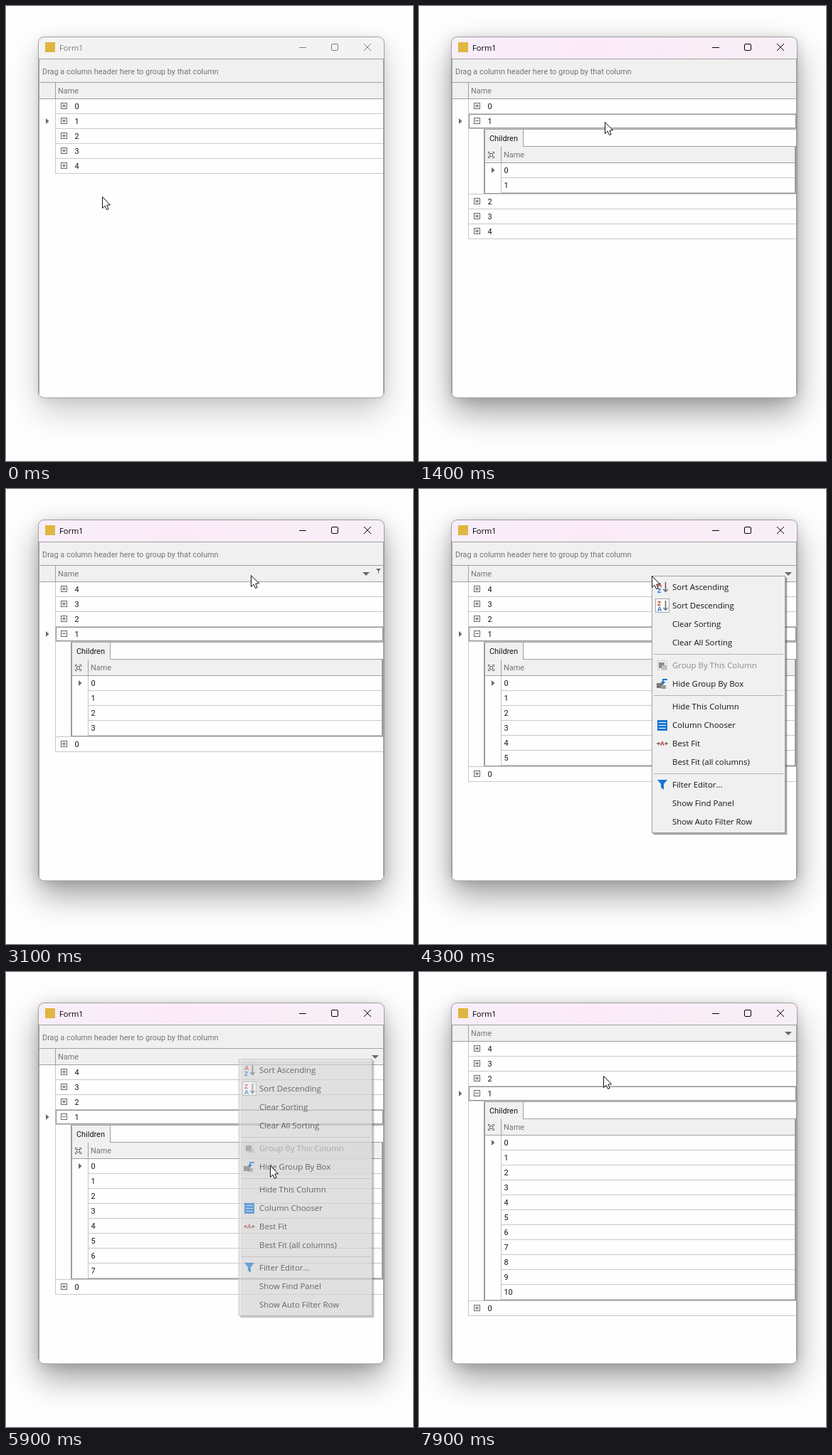
Write an HTML page with a canvas that moves like this. It is 572 by 640 pixels and loops after 8000 ms.

```html
<!DOCTYPE html>
<html lang="en">
<head>
<meta charset="utf-8">
<title>Grid</title>
<style>
html, body { margin: 0; width: 572px; height: 640px; overflow: hidden; background: #fefefe; }
canvas { display: block; }
</style>
</head>
<body>
<canvas id="stage" width="572" height="640"></canvas>
<script>
const ctx = document.getElementById('stage').getContext('2d');
const LOOP = 8000, TICK = 100, ROW = 21;
const PAPER = '#fefefe', PANEL = '#f0f0f0', EDGE = '#a0a0a0', GRID = '#c8c8c8';
const INK = '#141414', DIM = '#757578', GLYPH = '#6a6a6a', RED = '#d03a34', BLUE = '#1976d2';
const GRID_FONT = '10.9px Roboto, sans-serif';
const MENU_FONT = '11.4px "Open Sans", sans-serif';
const TITLE_FONT = '11.1px "Open Sans", sans-serif';

// time, x, y of the pointer tip
const PATH = [
  [0, 135, 268], [500, 83, 161], [700, 83, 161], [1400, 261, 163], [1600, 261, 163],
  [2200, 344, 121], [3600, 344, 121], [3700, 327, 122], [4900, 327, 122],
  [5300, 361, 206], [5700, 371, 272], [6400, 371, 272], [6500, 372, 271],
  [6600, 372, 271], [7200, 304, 196], [7700, 304, 196], [7900, 259, 146], [8000, 259, 146]
];

const clamp01 = v => Math.max(0, Math.min(1, v));

function rect(x, y, w, h, color) {
  ctx.fillStyle = color;
  ctx.fillRect(x, y, w, h);
}

function frame(x, y, w, h, color) {
  ctx.strokeStyle = color;
  ctx.lineWidth = 1;
  ctx.strokeRect(x + .5, y + .5, w - 1, h - 1);
}

const hline = (x1, x2, y, color) => rect(x1, y, x2 - x1, 1, color);
const vline = (x, y1, y2, color) => rect(x, y1, 1, y2 - y1, color);

function poly(points, fill) {
  ctx.beginPath();
  points.forEach(([x, y]) => ctx.lineTo(x, y));
  ctx.closePath();
  ctx.fillStyle = fill;
  ctx.fill();
}

function stroke(points, color, width = 1) {
  ctx.beginPath();
  points.forEach(([x, y], i) => i ? ctx.lineTo(x, y) : ctx.moveTo(x, y));
  ctx.strokeStyle = color;
  ctx.lineWidth = width;
  ctx.stroke();
}

function text(str, x, y, color = INK, font = GRID_FONT) {
  ctx.font = font;
  ctx.fillStyle = color;
  ctx.fillText(str, x, y);
}

function pointerAt(t) {
  const i = PATH.findIndex(k => k[0] > t);
  const [t0, x0, y0] = PATH[i - 1], [t1, x1, y1] = PATH[i];
  const u = (t - t0) / (t1 - t0), e = u * u * (3 - 2 * u);
  return [Math.round(x0 + (x1 - x0) * e), Math.round(y0 + (y1 - y0) * e)];
}

function shadow(dy, blur, alpha) {
  ctx.save();
  ctx.shadowColor = `rgba(0,0,0,${alpha})`;
  ctx.shadowBlur = blur;
  ctx.shadowOffsetY = dy;
  ctx.fillStyle = PAPER;
  ctx.beginPath();
  ctx.roundRect(46, 44, 485, 507, 8);
  ctx.fill();
  ctx.restore();
}

function drawWindow(active) {
  rect(0, 0, 572, 640, PAPER);
  shadow(20, 46, .2 + .18 * active);
  shadow(2, 16, .1 + .04 * active);

  ctx.save();
  ctx.beginPath();
  ctx.roundRect(46, 44, 485, 507, 7);
  ctx.clip();
  rect(46, 44, 485, 507, PAPER);
  rect(46, 44, 485, 30, '#f3f3f3');
  const tint = ctx.createLinearGradient(46, 0, 531, 0);
  tint.addColorStop(0, '#f7eef9');
  tint.addColorStop(.4, '#fcebf7');
  tint.addColorStop(1, '#f7eff7');
  ctx.globalAlpha = active;
  rect(46, 44, 485, 30, tint);
  ctx.restore();

  rect(55, 51, 14, 14, '#dfb640');
  const shade = Math.round(126 * (1 - active));
  const tone = `rgb(${shade},${shade},${shade})`;
  text('Form1', 75, 63, tone, TITLE_FONT);
  hline(412, 422, 58, tone);
  ctx.strokeStyle = tone;
  ctx.lineWidth = 1;
  ctx.beginPath();
  ctx.roundRect(457.5, 53.5, 9, 9, 1.5);
  ctx.stroke();
  stroke([[503, 53], [513, 63]], tone);
  stroke([[513, 53], [503, 63]], tone);
}

function drawBorder() {
  ctx.strokeStyle = '#9ca09c';
  ctx.lineWidth = 1;
  ctx.beginPath();
  ctx.roundRect(45.5, 43.5, 486, 507.5, 8);
  ctx.stroke();
  vline(46, 74, 545, EDGE);
  vline(530, 74, 545, EDGE);
}

function rowMark(x, cy) {
  poly([[x, cy - 4], [x + 4.5, cy], [x, cy + 4]], GLYPH);
}

function expander(cy, open) {
  frame(77, cy - 5, 9, 9, GLYPH);
  hline(79, 84, cy - 1, GLYPH);
  if (!open) vline(81, cy - 3, cy + 2, GLYPH);
}

function customizeIcon(x, y) {
  for (const sx of [0, 1]) for (const sy of [0, 1]) {
    const cx = x + sx * 8, cy = y + sy * 8;
    hline(cx - sx * 2, cx - sx * 2 + 3, cy, GLYPH);
    vline(cx, cy - sy * 2, cy - sy * 2 + 3, GLYPH);
  }
  frame(x + 2, y + 2, 5, 5, GLYPH);
}

// y is the bottom line of the master row
function drawDetail(y, count) {
  const end = y + 50 + ROW * count;
  rect(91, y + 1, 439, end - y, PAPER);
  hline(92, 530, y + 1, EDGE);
  rect(93, y + 2, 54, 25, PANEL);
  vline(146, y + 2, y + 26, EDGE);
  rect(93, y + 26, 435, 22, PANEL);
  hline(147, 529, y + 25, EDGE);
  hline(93, 529, y + 48, EDGE);
  vline(115, y + 26, y + 49, EDGE);
  vline(115, y + 49, end - 1, GRID);
  text('Children', 99, y + 18);
  customizeIcon(97, y + 33);
  text('Name', 119, y + 41, DIM);
  for (let i = 0; i < count; i++) {
    const top = y + 49 + i * ROW;
    hline(116, 528, top + 20, GRID);
    text(String(i), 119.5, top + 14);
  }
  rowMark(102, y + 59);
  rect(91, y + 1, 2, end - y, '#9c9c9c');
  rect(528, y + 25, 2, end - y - 24, '#9c9c9c');
  rect(91, end - 1, 439, 2, '#9c9c9c');
}

function drawHeader(top, sort, hovered) {
  rect(47, top, 483, 22, PANEL);
  hline(47, 530, top - 1, EDGE);
  hline(47, 530, top + 22, EDGE);
  vline(69, top, top + 23, EDGE);
  text('Name', 73, top + 15, DIM);
  const x = hovered ? 501 : 514, y = top + 9;
  if (sort === 'up') poly([[x, y + 5], [x + 10, y + 5], [x + 5, y]], GLYPH);
  if (sort === 'down') poly([[x, y], [x + 10, y], [x + 5, y + 5]], GLYPH);
  if (hovered) {
    poly([[520, top + 4], [527, top + 4], [524, top + 7.5], [524, top + 11],
      [523, top + 10], [523, top + 7.5]], GLYPH);
  }
}

function drawGrid(t) {
  const grouped = t < 6000;
  const header = grouped ? 108 : 75;
  const sort = t >= 2800 ? 'down' : t >= 2300 ? 'up' : '';
  const open = t >= 700;
  const count = Math.floor((t - 1390) / 712) + 2;

  if (grouped) {
    rect(47, 75, 483, 32, PANEL);
    text('Drag a column header here to group by that column', 51, 96, '#73737c');
  }
  hline(46, 531, 74, EDGE);
  drawHeader(header, sort, t >= 2100 && t < 3900);

  let y = header + 23;
  for (let i = 0; i < 5; i++) {
    const id = sort === 'down' ? 4 - i : i;
    const cy = y + 10, expanded = open && id === 1;
    hline(70, 530, y + 20, GRID);
    expander(cy, expanded);
    text(String(id), 96.5, y + 14);
    if (id === 1) rowMark(56, cy);
    if (expanded) {
      ctx.setLineDash([1, 1]);
      frame(70, y, 460, 20, '#222');
      ctx.setLineDash([]);
      drawDetail(y + 20, count);
      y += 50 + ROW * count;
      hline(70, 530, y + 20, GRID);
    }
    y += ROW;
  }
  vline(69, header + 23, y, GRID);
}

function sortIcon(cy, top, bottom) {
  const font = 'bold 9px "Open Sans", sans-serif';
  text(top, 335, cy, RED, font);
  text(bottom, 335, cy + 8, BLUE, font);
  stroke([[346.5, cy - 7], [346.5, cy + 6]], GLYPH, 1.6);
  stroke([[343.5, cy + 3], [346.5, cy + 6.5], [349.5, cy + 3]], GLYPH, 1.4);
}

const ICONS = {
  ascending: cy => sortIcon(cy, 'A', 'Z'),
  descending(cy, t) {
    rect(332, cy - 10, 20, 20, PAPER);
    frame(332, cy - 10, 20, 20, '#a6a6a6');
    if (t < 5200 || t >= 5500) sortIcon(cy, 'Z', 'A');
  },
  group(cy) {
    frame(335, cy - 7, 14, 14, '#d0d0d0');
    rect(337, cy - 4, 8, 8, '#8c8c8c');
    rect(341, cy, 7, 6, '#bcbcbc');
  },
  ungroup(cy) {
    rect(334, cy - 1, 9, 7, '#777');
    rect(340, cy + 2, 7, 5, '#9a9a9a');
    stroke([[349, cy - 6], [343, cy - 6], [343, cy - 1]], BLUE, 1.8);
    poly([[339.5, cy - 3], [346.5, cy - 3], [343, cy + 1]], BLUE);
  },
  columns(cy) {
    rect(335, cy - 7, 14, 15, BLUE);
    for (const d of [-4, 0, 4]) hline(337, 347, cy + d, '#fff');
  },
  fit(cy) {
    text('A', 338.7, cy + 3, RED, 'bold 9px "Open Sans", sans-serif');
    for (const [x, s] of [[334, 1], [350, -1]]) {
      stroke([[x, cy], [x + 4 * s, cy]], GLYPH, 1.4);
      poly([[x + 2 * s, cy - 2.5], [x + 5 * s, cy], [x + 2 * s, cy + 2.5]], GLYPH);
    }
  },
  filter(cy) {
    poly([[335, cy - 7], [349, cy - 7], [344, cy - 1], [344, cy + 7],
      [340, cy + 4], [340, cy - 1]], BLUE);
  }
};

const MENU = [
  ['Sort Ascending', 'ascending'], ['Sort Descending', 'descending'],
  ['Clear Sorting'], ['Clear All Sorting'], null,
  ['Group By This Column', 'group'], ['Hide Group By Box', 'ungroup'], null,
  ['Hide This Column'], ['Column Chooser', 'columns'],
  ['Best Fit', 'fit'], ['Best Fit (all columns)'], null,
  ['Filter Editor...', 'filter'], ['Show Find Panel'], ['Show Auto Filter Row']
];

function drawMenu(t) {
  if (t < 3900 || t >= 6000) return;
  ctx.save();
  ctx.globalAlpha = t < 4000 || t >= 5900 ? .6 : 1;
  rect(330, 125, 188, 362, 'rgba(0,0,0,.12)');
  rect(329, 124, 188, 362, 'rgba(0,0,0,.25)');
  rect(327, 122, 188, 362, PANEL);
  frame(327, 122, 188, 362, EDGE);
  let cy = 138;
  for (const item of MENU) {
    if (!item) {
      hline(330, 512, cy - 10, '#b4b4b4');
      cy += 6;
      continue;
    }
    const [label, icon] = item;
    if (icon === 'ungroup' && t >= 5600) rect(329, cy - 13, 184, 26, '#dcdcdc');
    if (icon) ICONS[icon](cy, t);
    text(label, 356, cy + 4, icon === 'group' ? '#8a8a8a' : INK, MENU_FONT);
    cy += 26;
  }
  ctx.restore();
}

function drawPointer([x, y]) {
  ctx.save();
  ctx.translate(x + .5, y + .5);
  ctx.lineJoin = 'round';
  poly([[0, 0], [0, 16], [3.6, 12.7], [6, 18], [8.6, 17], [6.3, 11.6], [11, 11.3]], '#fff');
  ctx.strokeStyle = '#111';
  ctx.lineWidth = 1;
  ctx.stroke();
  ctx.restore();
}

function draw() {
  const t = Math.floor(performance.now() % LOOP / TICK) * TICK;
  drawWindow(clamp01((t - 600) / 300));
  drawGrid(t);
  drawBorder();
  drawMenu(t);
  drawPointer(pointerAt(t));
  requestAnimationFrame(draw);
}
draw();
</script>
</body>
</html>
```
